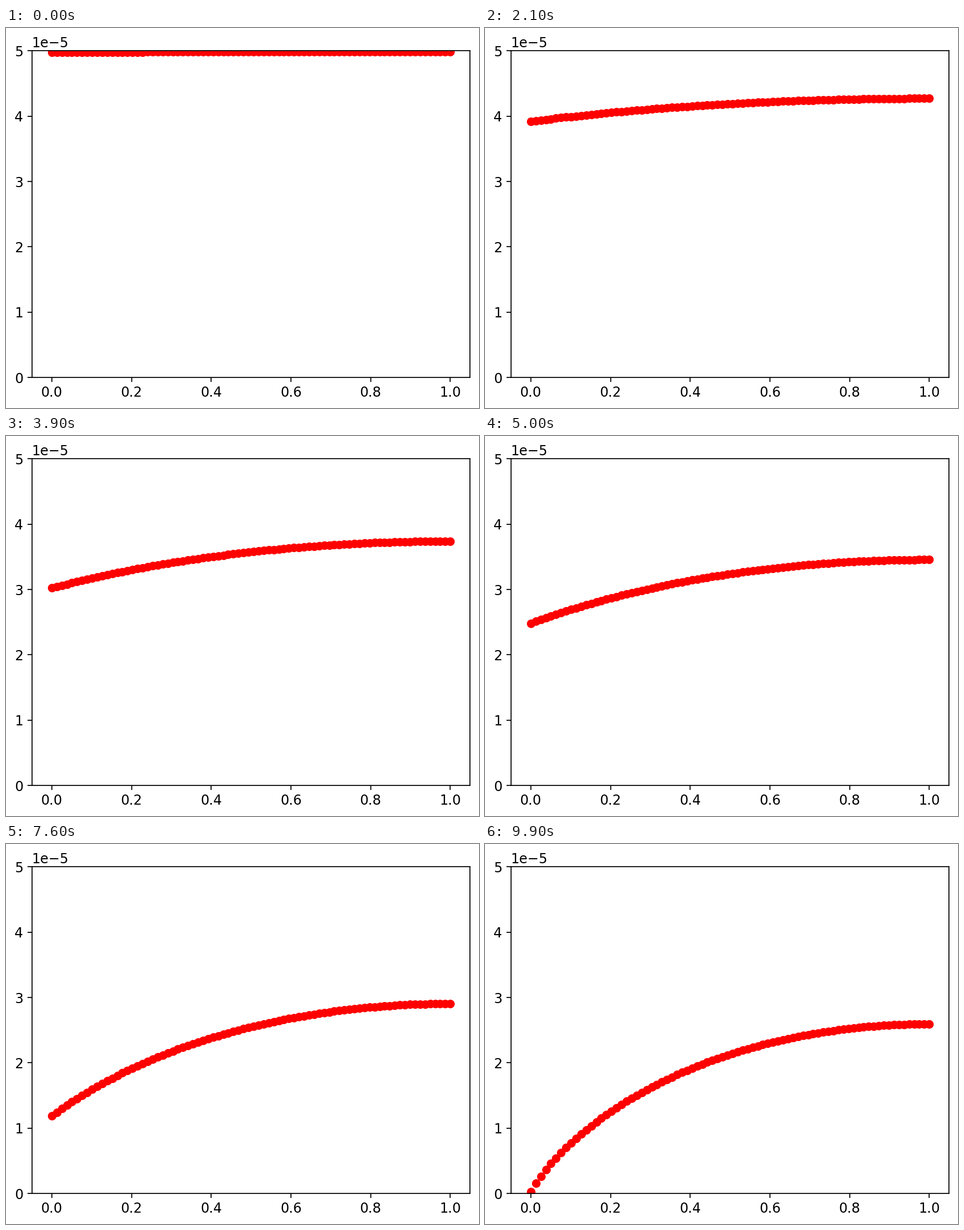
Animation, 835 px wide and 671 px high, one loop 10 s. Source, as a matplotlib script:

```python
"""A narrow pore closing by deposition: its mouth shrinks at a steady rate,
the depth slows down as less and less reactant gets through."""
import numpy as np
import matplotlib.pyplot as plt
from matplotlib.animation import FuncAnimation

W, H, DPI = 835, 671, 156
FRAMES, INTERVAL = 100, 100
STEPS_PER_FRAME = 2.5

N = 80            # points along the pore
R0 = 5e-5         # starting radius
SHRINK = 1.997e-7  # radius lost at the mouth per step
THIELE = 0.757    # reaction rate against diffusion at the starting radius

x = np.linspace(0, 1, N)


def concentration(r):
    """Solve c'' = THIELE * c / (r / R0)^2 with c(0) = 1 and c'(1) = 0."""
    h = x[1]
    a = np.diag(-2 - THIELE * (h * R0 / r) ** 2)
    a += np.eye(N, k=1) + np.eye(N, k=-1)
    a[0] = 0
    a[0, 0] = 1
    a[-1, -2] = 2
    b = np.zeros(N)
    b[0] = 1
    return np.linalg.solve(a, b)


def simulate(steps):
    r = np.full(N, R0)
    history = []
    for _ in range(steps):
        r = r - SHRINK * concentration(r)
        history.append(r)
    return history


def step_of(frame):
    return int(np.ceil(frame * STEPS_PER_FRAME))


radii = simulate(step_of(FRAMES - 1) + 1)

plt.rcParams.update({"font.family": "DejaVu Sans", "font.size": 11})

# The small surplus guards against rounding down to one pixel less.
fig = plt.figure(figsize=((W + 0.01) / DPI, (H + 0.01) / DPI), dpi=DPI,
                 facecolor="white")
ax = fig.add_axes([45.65 / W, 53.93 / H, 4.96 * DPI / W, 3.696 * DPI / H])
ax.set_xlim(-0.05, 1.05)
ax.set_ylim(0, R0)
ax.set_xticks(np.linspace(0, 1, 6))
ax.set_yticks(np.arange(6) * 1e-5)
dots, = ax.plot(x, radii[0], "ro")


def update(frame):
    dots.set_ydata(radii[step_of(frame)])
    return dots,


anim = FuncAnimation(fig, update, frames=FRAMES, interval=INTERVAL,
                     init_func=lambda: update(0), repeat=True, repeat_delay=0)
plt.show()
```
